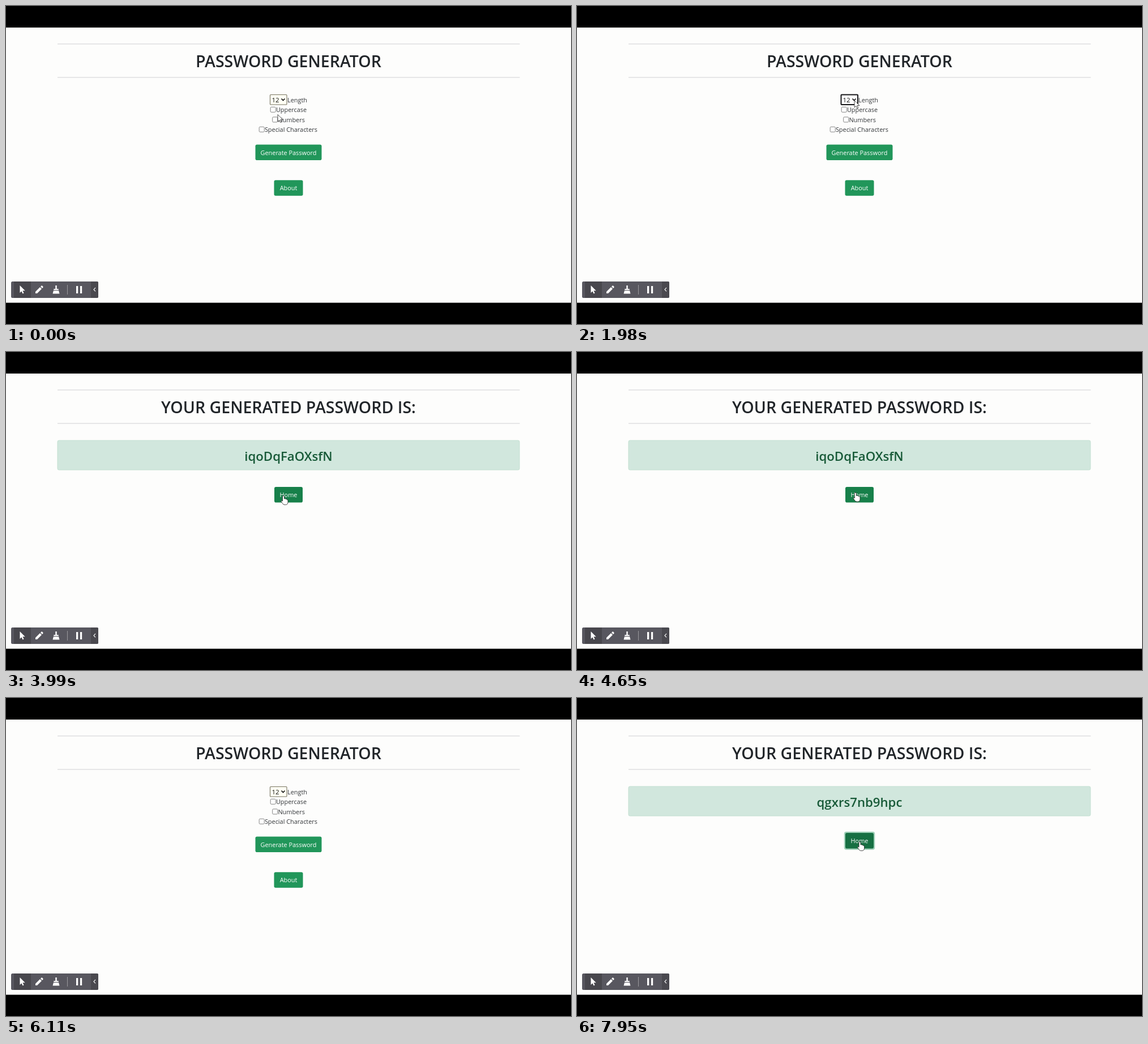
Write an HTML page that moves like this. It is 998 by 561 pixels and loops after 7990 ms.

```html
<!DOCTYPE html>
<html lang="en">
<head>
<meta charset="utf-8">
<title>Password generator</title>
<style>
  html, body { margin: 0; width: 100%; height: 100%; overflow: hidden; background: #000; }
  svg { display: block; width: 100vw; height: 100vh; font: 10.9px "Open Sans", "Noto Sans", sans-serif; fill: #34373a; }
  .title { font-size: 28.5px; font-weight: 600; fill: #212529; text-anchor: middle; }
  .password { font-size: 22.2px; font-weight: 600; fill: #185a38; text-anchor: middle; }
  .button rect { fill: #21965a; }
  .button text { fill: #fff; text-anchor: middle; }
  .button .ring { fill: #9fd0b8; visibility: hidden; }
  .button.hover .face { fill: #17804a; }
  .button.focus .face { fill: #177043; }
  .button.focus .ring { visibility: visible; }
  .box { fill: #fff; stroke: #777; }
  .tick { fill: none; stroke: #fff; stroke-width: 1.5; }
  .icons { fill: #fff; }
  .pointer { fill: #fff; stroke: #222; stroke-width: .8; stroke-linejoin: round; }
</style>
</head>
<body>
<svg viewBox="0 0 998 561" preserveAspectRatio="none">
  <rect width="998" height="561" fill="#000"/>
  <rect y="38" width="998" height="485.500" fill="#fdfdfc"/>
  <path d="M91 67H907.500M91 126H907.500" stroke="#cfd0d3" stroke-width="1.2"/>

  <g id="form">
    <text class="title" x="499" y="108">PASSWORD GENERATOR</text>
    <rect id="select" x="466.500" y="156.500" width="29.500" height="17.500" rx="1"/>
    <text x="469.500" y="170" font-size="11.5" fill="#111">12</text>
    <path d="M486.500 163.500l3 3 3-3" fill="none" stroke="#111" stroke-width="1.7"/>
    <text x="497" y="170">Length</text>
    <g id="options"></g>
    <g id="formButtons"></g>
  </g>

  <g id="result">
    <text class="title" x="499" y="108">YOUR GENERATED PASSWORD IS:</text>
    <rect x="91" y="156" width="816" height="52" rx="2.500" fill="#d1e7dd" stroke="#c2dfd1"/>
    <text id="password" class="password" x="499" y="191.500"></text>
    <g id="resultButtons"></g>
  </g>

  <g class="icons">
    <rect x="9" y="486" width="154" height="29" rx="2.500" fill="#58575f"/>
    <path d="M14 486H44V515H14z" fill="#48474d"/>
    <path d="M150 486h10.500a2.500 2.500 0 0 1 2.500 2.500v24a2.500 2.500 0 0 1-2.500 2.500h-10.500z" fill="#4a494f"/>
    <path d="M24.500 493v13l3-2.800 2 4.300 2-1-2-4.200h4.200z"/>
    <path d="M52 507v-3l8-8 3 3-8 8zM61 495l1.500-1.500q.7-.5 1.400 0l1.500 1.500q.6.700 0 1.400L64 498z"/>
    <path d="M87.300 493h2.400v6h3v2h-8.400V499h3zM84 502h9l1.500 5.500H82.500z"/>
    <path d="M124 494h3.200v13H124zM131 494h3.200v13H131z"/>
    <path d="M108.500 492v17" stroke="#99989e"/>
    <path d="M158 497l-3 3.200 3 3.200" fill="none" stroke="#fff" stroke-width="1.100"/>
  </g>

  <g id="cursor" class="pointer">
    <path id="arrow" d="M0 0V12.500L2.900 9.900 4.900 14 6.800 13.100 4.900 9.100H9z"/>
    <path id="hand" d="M-1.500 9V1Q-1.500-.5 0-.5T1.500 1V5Q3.500 4 4.200 5.500 6 5 6.300 6.500 8 6 8 8V11Q8 15.500 3.500 15.500H2Q-.5 15.500-2 12.500L-4 9.500Q-3.500 7.500-1.500 9z"/>
  </g>
</svg>

<script>
const LOOP = 7990;
const $ = id => document.getElementById(id);
const show = (node, on) => node.style.display = on ? '' : 'none';

const buttonMarkup = ({ id, label, x, y, w }) => `
  <g id="${id}" class="button">
    <rect class="ring" x="${x - 2.2}" y="${y - 2.2}" width="${w + 4.4}" height="31.9" rx="4"/>
    <rect class="face" x="${x}" y="${y}" width="${w}" height="27.5" rx="2.8"/>
    <text x="${x + w / 2}" y="${y + 18}">${label}</text>
  </g>`;

const optionMarkup = ({ id, label, x, y }) => `
  <rect class="box" x="${x + .5}" y="${y + .5}" width="9" height="9" rx="1.5" stroke-width=".9"/>
  <g id="${id}">
    <rect x="${x}" y="${y}" width="10" height="10" rx="1.7" fill="#1473e0"/>
    <path class="tick" d="M${x + 2} ${y + 5}l2.200 2.200 4-4.500"/>
  </g>
  <text x="${x + 10.2}" y="${y + 9.6}">${label}</text>`;

const generate = { id: 'generate', label: 'Generate Password', x: 440.5, y: 244.5, w: 117 };
const about = { id: 'about', label: 'About', x: 473.5, y: 307.3, w: 51 };
const home = { id: 'home', label: 'Home', x: 474, y: 238, w: 50 };
const options = [
  { id: 'uppercase', label: 'Uppercase', x: 466.7, y: 177.8 },
  { id: 'numbers', label: 'Numbers', x: 470.2, y: 195.4 },
  { id: 'special', label: 'Special Characters', x: 446.7, y: 212.7 }
];
$('options').innerHTML = options.map(optionMarkup).join('');
$('formButtons').innerHTML = buttonMarkup(generate) + buttonMarkup(about);
$('resultButtons').innerHTML = buttonMarkup(home);

// Cursor stops: time, x, y
const stops = [
  [0, 480, 191.5], [200, 480, 191.5], [780, 490, 166.5], [2300, 490, 166.5],
  [2850, 476, 184.5], [2940, 476, 184.5], [3060, 473, 183], [3250, 473, 183],
  [3750, 490, 254], [4100, 490, 254], [4450, 492, 248.5], [5100, 492, 248.5],
  [6200, 486, 225], [6500, 475, 200], [6700, 475, 200], [7120, 489, 254.5],
  [7500, 489, 254.5], [7850, 499.5, 254], [LOOP, 499.5, 254]
];

function cursorAt(t) {
  const i = stops.findIndex(stop => stop[0] > t);
  const [t0, x0, y0] = stops[i - 1], [t1, x1, y1] = stops[i];
  const p = (t - t0) / (t1 - t0), ease = p * p * (3 - 2 * p);
  return [x0 + (x1 - x0) * ease, y0 + (y1 - y0) * ease];
}

const between = (t, from, to) => t >= from && t < to;

function draw(t) {
  const [x, y] = cursorAt(t);
  const onResult = between(t, 3980, 5120) || t >= 7440;
  const cursorShown = !between(t, 5120, 6200);
  const over = (b, h = 27.5) => cursorShown && x >= b.x && x <= b.x + b.w && y >= b.y && y <= b.y + h;

  show($('form'), !onResult);
  show($('result'), onResult);
  $('password').textContent = t < 6000 ? 'iqoDqFaOXsfN' : 'qgxrs7nb9hpc';
  show($('uppercase'), between(t, 3120, 3980));
  show($('numbers'), between(t, 6600, 7440));
  show($('special'), false);

  const selectFocused = between(t, 950, 3120);
  const selectHover = over({ x: 466, y: 156, w: 30 }, 18);
  const select = $('select');
  select.setAttribute('fill', selectFocused || selectHover ? '#fff' : '#fffff4');
  select.setAttribute('stroke', selectFocused || selectHover ? '#18181a' : '#77735e');
  select.setAttribute('stroke-width', selectFocused ? 2 : 1.1);

  const focused = {
    generate: between(t, 3880, 3980) || between(t, 7230, 7440),
    home: between(t, 4980, 5120) || t >= 7900
  };
  const active = onResult ? [home] : [generate, about];
  for (const b of active) {
    $(b.id).classList.toggle('hover', over(b));
    $(b.id).classList.toggle('focus', !!focused[b.id]);
  }

  const hand = active.some(b => over(b));
  show($('cursor'), cursorShown);
  show($('hand'), hand);
  show($('arrow'), !hand);
  $('cursor').setAttribute('transform', `translate(${x} ${y})`);
}

const start = performance.now();
function tick() {
  draw((performance.now() - start) % LOOP);
  requestAnimationFrame(tick);
}
tick();
</script>
</body>
</html>
```
